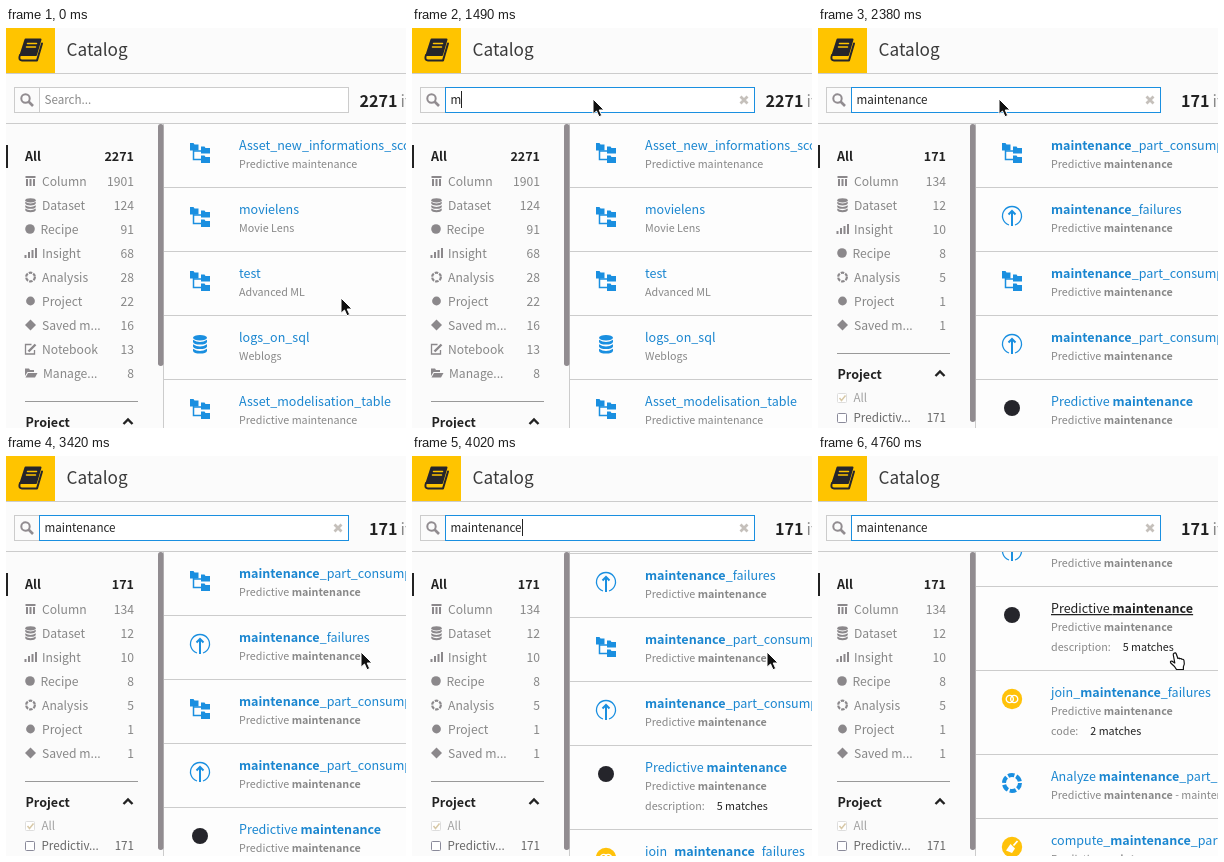
An HTML page that plays this animation: 400x400 px, repeating every 4.91 s.

```html
<!DOCTYPE html>
<html lang="en">
<head>
<meta charset="utf-8">
<title>Catalog search</title>
<style>
html, body { margin: 0; width: 100%; height: 100%; overflow: hidden; background: #fbfbfb; }
svg { display: block; width: 400px; height: 400px; }
text {
  font-family: "Noto Sans CJK JP", "Noto Sans CJK SC", "Noto Sans CJK", "Open Sans", sans-serif;
  font-size: 12.54px; fill: #222; font-kerning: normal;
}
.b { font-weight: 700; }
.head { font-size: 17.2px; font-weight: 300; fill: #3a3a3a; }
.count { font-size: 16.1px; }
.items { font-size: 16.1px; font-weight: 300; fill: #888; }
.field { font-size: 11.64px; }
.hint { fill: #888; font-weight: 300; }
.facet { font-size: 12.15px; fill: #878787; font-weight: 300; }
.small { font-size: 11.64px; font-weight: 300; fill: #666; }
.title { fill: #1a86d0; }
.sub { font-size: 10.74px; fill: #888; }
.val { fill: #222; }
.hover .title { fill: #222; text-decoration: underline; }
.blue { color: #1a8fe0; }
.grey { color: #8b888b; }
.gold { color: #ffc20a; }
.dark { color: #25252b; }
.rule { stroke: #ccc; }
</style>
</head>
<body>
<svg viewBox="0 0 400 400">
  <defs>
    <clipPath id="pane"><rect x="158" y="96" width="242" height="304"/></clipPath>

    <!-- icons, centred on 0,0 -->
    <g id="tree" fill="currentColor">
      <path d="M-10-9h3.500l1 1.500h4v6H-10zM1-5.500h3.500l1 1.500H10v5.500H1zM1 3.500h3.500l1 1.500H10v6H1z"/>
      <path d="M-6.500-3V7.500H2M-6.500-1H2" fill="none" stroke="currentColor" stroke-width="1.500"/>
    </g>
    <g id="db" fill="currentColor">
      <ellipse cy="-6.200" rx="7" ry="2.800"/>
      <path id="disc" d="M-7-4.300q7 4.600 14 0v2.300q-1 2.600-7 2.600t-7-2.600z"/>
      <use href="#disc" y="4.500"/><use href="#disc" y="9"/>
    </g>
    <g id="up" fill="none" stroke="currentColor">
      <path d="M-3 9A9.500 9.500 0 1 1 3 9" stroke-width="1.300"/>
      <path d="M0 10V-4M-3.500-1.500L0-5 3.500-1.500" stroke-width="2"/>
    </g>
    <circle id="project" r="8" fill="currentColor"/>
    <g id="join">
      <circle r="10.200" fill="currentColor"/>
      <g fill="none" stroke="#fff" stroke-width="1.300"><circle cx="-2.200" r="3.600"/><circle cx="2.200" r="3.600"/></g>
    </g>
    <g id="broom">
      <circle r="10.200" fill="currentColor"/>
      <path d="M5.500-6L1.500-1.500" stroke="#fff" stroke-width="1.800"/>
      <path d="M-1.500-3L3 1.500 0 6-6 3.500z" fill="#fff"/>
    </g>
    <circle id="ring" r="8" fill="none" stroke="currentColor" stroke-width="4" stroke-dasharray="6.400 1.978"/>

    <g id="column" fill="currentColor">
      <path d="M-5-5H5v2H-5zM-4.500-2h2v7h-2zM-1-2h2v7h-2zM2.500-2h2v7h-2z"/>
    </g>
    <circle id="recipe" r="4.800" fill="currentColor" cx="-.5"/>
    <path id="insight" fill="currentColor" d="M-6 2h2v3h-2zM-2.500-1h2v6h-2zM1-3h2v8H1zM4.500-5h2V5h-2z"/>
    <path id="model" fill="currentColor" d="M0-5.500L5.500 0 0 5.500-5.500 0z"/>
    <g id="note" fill="none" stroke="currentColor">
      <path d="M1-4.500h-6v9.500h9V1" stroke-width="1.300"/>
      <path d="M-2 2.500L5-4.500" stroke-width="2.400"/>
    </g>
    <path id="folder" fill="currentColor" d="M-5.500-4.500h4l1 1.500h4v2h-6.500l-2.500 4zM-2.500 0H7L4.500 4.500h-9.500z"/>
  </defs>

  <rect width="400" height="400" fill="#fbfbfb"/>
  <rect x="158" y="96" width="242" height="304" fill="#fdfdfd"/>
  <g id="scenes"></g>
  <path class="rule" d="M0 45.500H400M0 95.500H400M157.500 96V400"/>
  <rect id="thumb" x="152" y="96" width="5.500" rx="2.700" fill="#918c90"/>
  <rect y="117" width="2" height="23" fill="#222"/>

  <rect width="49" height="45" fill="#ffc400"/>
  <g stroke="#25252b" stroke-width="2" stroke-linejoin="round" stroke-linecap="round">
    <path d="M19.500 11.500H34.500L30 27H14.500z" fill="#25252b"/>
    <path d="M14 27q-2 5 2 5.500H31L36 15.500" fill="none"/>
    <path d="M21.500 15.500H30.500M20.500 19H29.500" stroke="#ffc400" stroke-width="1.500"/>
  </g>
  <text class="head" x="60.500" y="28">Catalog</text>

  <rect x="8.500" y="59.500" width="25" height="25" fill="#fbfbfb" stroke="#ccc"/>
  <g fill="none" stroke="#918c90" stroke-width="2"><circle cx="19.500" cy="70.500" r="4.200"/><path d="M22.500 73.500L27 78" stroke-width="2.600"/></g>
  <rect id="box" x="33.500" y="59.500" width="309" height="25" fill="#fff"/>
  <text id="hint" class="field hint" x="38.500" y="76">Search...</text>
  <text id="typed" class="field" x="38.500" y="76"></text>
  <rect id="caret" y="63" width="1" height="17" fill="#222"/>
  <path id="clear" d="M328.500 68.500l7 7m0-7l-7 7" stroke="#c5c0bb" stroke-width="2.800"/>
  <text class="items" x="394.500" y="79">items</text>

  <g id="pointer" stroke="#fff" stroke-linejoin="round">
    <path id="arrow" fill="#111" d="M0 0V15.200L3.500 12 6 17.700 8.700 16.500 6.200 11H11z"/>
    <path id="hand" fill="#fff" stroke="#111" stroke-width="1.200" d="M1 1.200q1.600-1 2.300.8l1.600 4.500q1.200-1 2.100.3 1.200-.8 2 .6 1.700-.6 2 1.200.9 3.600-.6 6.200v2.700H3.500q-1.500-3-5.500-6.200-1.500-2.200.8-2.300l3 2L.3 3Q0 1.800 1 1.200z"/>
  </g>
</svg>

<script>
const LOOP = 4910;
const $ = id => document.getElementById(id);

// *word* marks bold text
const rich = s => String(s).replace(/\*(.+?)\*/g, '<tspan class="b">$1</tspan>');
const icon = (name, tone, x, y, k = 1) =>
  `<use href="#${name}" class="${tone}" transform="translate(${x} ${y}) scale(${k})"/>`;
const text = (cls, x, y, s, extra = '') => `<text class="${cls}" x="${x}" y="${y}" ${extra}>${rich(s)}</text>`;
const right = 'text-anchor="end"';

const tones = { project: 'dark', join: 'gold', broom: 'gold' };
function results(rows) {
  let y = 96;
  return rows.map(([name, title, sub, label, value]) => {
    const h = label ? 84 : 64;
    let out = icon(name, tones[name] || 'blue', 194, y + 28) +
      text('title', 233, y + 26, title) + text('sub', 233, y + 44, sub);
    if (label) out += text('sub', 233, y + 64, `${label}:<tspan class="val" dx="12">${rich(value)}</tspan>`);
    out += `<path class="rule" d="M158 ${y + h - .5}H400"/>`;
    y += h;
    return `<g class="row">${out}</g>`;
  }).join('');
}

// label, icon, icon scale, text x
const kinds = {
  c: ['Column', 'column', 1, 36], d: ['Dataset', 'db', .75, 36], r: ['Recipe', 'recipe', 1, 34.5],
  i: ['Insight', 'insight', 1, 36], a: ['Analysis', 'ring', .55, 36], p: ['Project', 'project', .55, 36],
  s: ['Saved m...', 'model', 1, 36], n: ['Notebook', 'note', 1, 36], m: ['Manage...', 'folder', 1, 37]
};
function sidebar(total, order, counts, open) {
  let out = text('b', 19, 133, 'All') + text('b', 128, 133, total, right);
  [...order].forEach((key, i) => {
    const [label, name, k, x] = kinds[key], y = 153 + 24 * i;
    out += icon(name, 'grey', 24.5, y, k) + text('facet', x, y + 4.5, label) + text('facet', 128, y + 4.5, counts[i], right);
  });
  const y = 157.5 + 24 * order.length;
  out += `<path d="M19 ${y}H132" stroke="#999"/>` + text('b', 19.5, y + 25.5, 'Project') +
    `<path d="M117.500 ${y + 22.5}l4.500-4.500 4.500 4.500" fill="none" stroke="#222" stroke-width="2.400"/>`;
  if (open) out +=
    `<g fill="#fff"><rect x="19.500" y="365.500" width="9" height="9" rx="1" stroke="#ddd"/>
     <rect x="19.500" y="385.500" width="9" height="9" rx="1" stroke="#8a8a9a"/></g>
     <path d="M21.500 370l2 2.500 4-5" fill="none" stroke="#d8c9a8" stroke-width="1.500"/>` +
    text('small', 35.5, 373.5, 'All', 'opacity=".6"') +
    text('small', 35.5, 393.5, 'Predictiv...') + text('small', 128, 393.5, '171', right);
  return out;
}

const scene = (total, side, rows) =>
  `<g>${side}${text('b count', 391.5, 79, total, right)}<g clip-path="url(#pane)"><g class="list">${results(rows)}</g></g></g>`;

const pm = 'Predictive maintenance', pmb = 'Predictive *maintenance*';
const journey = 'The Complete Journey', part = '*maintenance*_part_consumption';
$('scenes').innerHTML =
  scene('2271', sidebar('2271', 'cdriapsnm', [1901, 124, 91, 68, 28, 22, 16, 13, 8]), [
    ['tree', 'Asset_new_informations_scored', pm],
    ['tree', 'movielens', 'Movie Lens'],
    ['tree', 'test', 'Advanced ML'],
    ['db', 'logs_on_sql', 'Weblogs'],
    ['tree', 'Asset_modelisation_table', pm]
  ]) +
  scene('671', sidebar('671', 'crdpiamns', [476, 84, 58, 17, 15, 8, 8, 3, 2]), [
    ['db', 'journey__attributes_t', journey, 'columns', '17 matching'],
    ['tree', 'usage_data_by_Asset', pmb, 'column', 'Use_*max*'],
    ['db', 'journey__train_t', journey, 'columns', '17 matching'],
    ['db', 'journey__test_t', journey, 'columns', '17 matching']
  ]) +
  scene('171', sidebar('171', 'cdiraps', [134, 12, 10, 8, 5, 1, 1], true), [
    ['tree', part, pmb],
    ['up', '*maintenance*_failures', pmb],
    ['tree', part, pmb],
    ['up', part, pmb],
    ['project', pmb, pmb, 'description', '5 matches'],
    ['join', 'join_*maintenance*_failures', pmb, 'code', '2 matches'],
    ['ring', 'Analyze ' + part, pmb + ' - maintenance_part'],
    ['broom', 'compute_' + part, pmb]
  ]);

const scenes = [...$('scenes').children];
const list = scenes[2].querySelector('.list');
const hovered = list.children[4];

// each track holds its value until the next time
const tracks = {
  scene: [[0, 0], [1940, 1], [2230, 2]],
  focus: [[0, false], [1190, true]],
  caret: [[0, false], [1190, true], [2380, false], [2980, true], [3420, false], [3870, true], [4460, false]],
  typed: [[0, ''], [1490, 'm'], [1640, 'main'], [1790, 'mainte'], [1940, 'maintenan'], [2090, 'maintenance']],
  scroll: [[0, 0], [3870, 18], [4020, 62], [4160, 116], [4310, 168], [4460, 204], [4760, 221]],
  hover: [[0, false], [4760, true]],
  pos: [[0, [335, 270]], [150, [319, 251]], [440, [304, 231]], [590, [270, 186]], [740, [232, 135]],
    [890, [201, 95]], [1040, [185, 75]], [1340, [181, 71]], [2980, [212, 90]], [3130, [295, 148]],
    [3280, [358, 190]], [3420, [355, 196]]]
};
const at = (track, t) => track.findLast(([start]) => start <= t)[1];
const show = (el, on) => el.setAttribute('visibility', on ? 'visible' : 'hidden');

function draw(t) {
  const s = {};
  for (const key in tracks) s[key] = at(tracks[key], t);

  scenes.forEach((el, i) => el.style.display = i === s.scene ? '' : 'none');
  list.setAttribute('transform', `translate(0 ${-s.scroll})`);
  hovered.classList.toggle('hover', s.hover);
  $('thumb').setAttribute('height', s.scene === 2 ? 298 : 242);

  $('box').setAttribute('stroke', s.focus ? '#1a8fe0' : '#ccc');
  $('typed').textContent = s.typed;
  show($('hint'), !s.typed);
  show($('clear'), s.typed);
  $('caret').setAttribute('x', Math.round(38.5 + (s.typed ? $('typed').getComputedTextLength() : 0)));
  show($('caret'), s.caret);

  $('pointer').setAttribute('transform', `translate(${s.pos})`);
  show($('arrow'), !s.hover);
  show($('hand'), s.hover);
}

const begin = performance.now();
function tick() {
  draw(Math.max(0, performance.now() - begin) % LOOP);
  requestAnimationFrame(tick);
}
tick();
</script>
</body>
</html>
```
